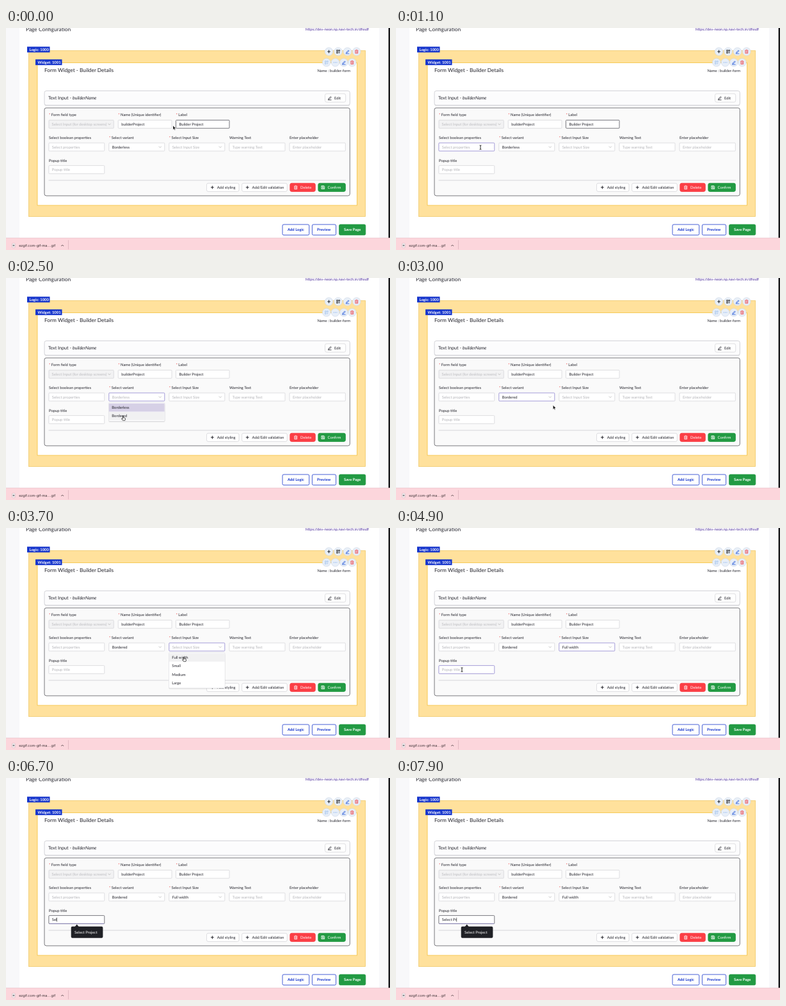
An HTML page that plays this animation: 600 px wide and 348 px high, repeating every 8000 ms.

```html
<!DOCTYPE html>
<html lang="en">
<head>
<meta charset="utf-8">
<style>
html, body { margin: 0; width: 100%; height: 100%; overflow: hidden; background: #fff; }
svg { display: block; width: 600px; height: 348px; }
text { font-family: Lato, sans-serif; text-rendering: geometricPrecision; white-space: pre; }
</style>
</head>
<body>
<svg viewBox="0 0 600 348"><g id="page"></g><g id="live"></g></svg>
<script>
const INK = '#24242c', HINT = '#b4b4b8', LINE = '#d6d6da', PURPLE = '#8f84cf',
      BLUE = '#1736cc', GREEN = '#229a43', RED = '#fb3e45';
const LOOP = 8000;

const rect = (x, y, x2, y2, fill, stroke = 'none', r = 0, extra = '') =>
  `<rect x="${x}" y="${y}" width="${x2 - x}" height="${y2 - y}" rx="${r}" fill="${fill}" stroke="${stroke}" stroke-width=".8" ${extra}/>`;
const text = (x, y, s, fill = INK, size = 5.9, extra = '') =>
  `<text x="${x}" y="${y}" font-size="${size}" fill="${fill}" ${extra}>${s}</text>`;
const path = (d, stroke = INK, w = .8, fill = 'none') =>
  `<path d="${d}" fill="${fill}" stroke="${stroke}" stroke-width="${w}"/>`;
const at = (x, y, s) => `<g transform="translate(${x} ${y})">${s}</g>`;
const label = (x, y, s, needed) =>
  needed ? text(x, y, '*', '#f04444') + text(x + 3.8, y, s) : text(x, y, s);
const chevron = (x, y, color = '#aaa') => path(`M${x - 2} ${y - 1}l2 2l2-2`, color, .7);

const icon = {
  plus: c => path('M-2.4 0H2.4M0-2.4V2.4', c, 1),
  grid: c => path('M-2.4-2.4h1.8v1.8h-1.8zM.7-2.4h1.8v1.8H.7zM-2.4.7h1.8v1.8h-1.8zM.7 1.6h1.8M1.6.7v1.8', c, .8),
  dots: c => path('M-2.8 0h1M-.5 0h1M1.8 0h1', c, 1),
  pen: c => path('M-1.6 1L1.5-2.1L2.5-1.1L-.6 2L-2 2.3zM-2.8 3.2H2.8', c, .8),
  bin: c => path('M-2.6-1.8H2.6M-.9-2.7H.9M-1.9-1.6V2.7H1.9V-1.6M-.6-.4V1.5M.6-.4V1.5', c, .8),
  save: c => path('M-2.4-2.4H1.5L2.4-1.5V2.4H-2.4zM-1.3-2.2V-.7H1V-2.2M-1.2 2.2V.7H1.2V2.2', c, .8)
};
const round = (x, y, name, color) =>
  `<circle cx="${x}" cy="${y}" r="6.3" fill="#e8eff8" stroke="#cbd6e4" stroke-width=".6"/>` + at(x, y, icon[name](color));
const button = (x, x2, s, name, tx, fill = '#fff', color = INK, y = 243.3, y2 = 256.4) =>
  rect(x, y, x2, y2, fill, fill === '#fff' ? LINE : fill, 2.5) +
  at(tx - 7.3, (y + y2) / 2, icon[name](color)) + text(tx, (y + y2) / 2 + 2.1, s, color);
const bigButton = (x, x2, s, tx, fill, color, stroke) =>
  rect(x, 308, x2, 324.6, fill, stroke, 2) + text(tx, 318.4, s, color, 5.9, 'font-weight="700"');
const tag = (x, y, x2, s) =>
  rect(x, y, x2, y + 9, BLUE) + text(x + 3.6, y + 6.6, s, '#fff', 5.9, 'font-weight="700"');

const page = [
  rect(0, 0, 600, 348, '#f8f8fa'), rect(21, 0, 583, 330, '#fff'), rect(597.6, 0, 600, 330, '#17171a'),
  text(31, 4.8, 'Page Configuration', INK, 8.4),
  text(468, 3.6, 'https://dev-neon.np.navi-tech.in/dfssdf', '#4b2c9b', 5.8),

  rect(35.5, 35.5, 561.5, 295.5, '#ffe19c', '#efc968'),
  rect(49, 54.5, 548.5, 278, '#fff', '#f4c13c'),
  tag(33, 29.3, 68.5, 'Logic: 1000'), tag(46, 49.2, 87.5, 'Widget: 1001'),
  round(504.5, 37, 'plus', '#222'), round(519, 37, 'grid', '#222'),
  round(533.5, 37, 'pen', '#2458d8'), round(547.8, 37, 'bin', '#ee4048'),
  round(500.8, 54, 'grid', '#a9c7ef'), round(514.5, 54, 'dots', '#6fa0e8'),
  round(527.8, 54, 'pen', '#2458d8'), round(540.8, 54, 'bin', '#ee4048'),
  text(60, 69.2, 'Form Widget - Builder Details', INK, 8.3),
  text(486.5, 68.6, 'Name : builder-form', INK, 5.85),

  rect(60, 99.5, 537.5, 122.4, '#e6e6e8', 'none', 3),
  rect(60, 98.5, 537.3, 121, '#fcfcfd', '#c9c9ce', 3),
  text(66, 112.2, 'Text Input - <tspan font-style="italic" font-size="7">builderName</tspan>', INK, 7.2),
  button(498.5, 530.7, 'Edit', 'pen', 513, '#fff', INK, 103, 116.2),

  rect(60, 125.2, 537.3, 263, '#fafafa', '#56565c', 3),
  label(67, 138.4, 'Form field type', 1), label(175.2, 138.4, 'Name (Unique identifier)', 1), label(265.5, 138.4, 'Label', 1),
  label(67, 174, 'Select boolean properties'), label(161, 174, 'Select variant', 1),
  label(254.8, 174, 'Select Input Size', 1), label(349, 174, 'Warning Text'), label(443, 174, 'Enter placeholder'),
  label(67, 209.6, 'Popup title'),
  path('M66.5 238.8H531', '#cfcfd3', .8),
  button(313.5, 364, 'Add styling', 'plus', 329.7), button(368.6, 439.3, 'Add/Edit validation', 'plus', 384.5),
  button(443.8, 483.3, 'Delete', 'bin', 460, RED, '#fff'), button(487.8, 530.4, 'Confirm', 'save', 502.6, GREEN, '#fff'),

  bigButton(432, 473.7, 'Add Logic', 440, '#fff', BLUE, BLUE),
  bigButton(478.4, 515.6, 'Preview', 486, '#fff', BLUE, BLUE),
  bigButton(520.5, 561.8, 'Save Page', 528, GREEN, '#fff', GREEN),

  rect(0, 329, 600, 348, '#fcd6dc'), path('M0 329.2H600', '#e6c0c7', .6),
  rect(9.6, 337.6, 14.2, 344.2, '#fff', '#d9b9c0', .6), rect(10.6, 339.6, 13.2, 342.2, '#8a8a90'),
  text(20.3, 343.1, 'ezgif.com-gif-ma....gif', '#3a2f33', 5.4, 'style="font-family:Inter,sans-serif"'),
  path('M86.2 342l2-2l2 2', '#5c4c50', .9), path('M97.5 332.5V347', '#d8aeb6', .7)
];
document.getElementById('page').innerHTML = page.join('');

// pointer stops: time, x, y
const stops = [[0, 261, 153], [300, 261, 153], [1000, 132, 187], [1300, 132, 187], [1750, 205, 187],
  [2000, 205, 187], [2400, 183, 217], [2750, 183, 217], [3200, 290, 187], [3350, 290, 187],
  [3650, 278, 203], [4050, 278, 203], [4800, 103, 222]];
function pointer(t) {
  const i = stops.findIndex(s => s[0] > t);
  if (i < 0) return stops.at(-1).slice(1);
  const [t0, x0, y0] = stops[i - 1], [t1, x1, y1] = stops[i];
  const k = (t - t0) / (t1 - t0), e = k * k * (3 - 2 * k);
  return [x0 + (x1 - x0) * e, y0 + (y1 - y0) * e];
}

const cursors = {
  arrow: path('M0 0V6.4L1.5 5L2.5 7.2L3.5 6.7L2.5 4.6H4.5z', '#fff', .4, '#111'),
  beam: path('M-1.4-3.2Q0-3.2 0-2.4Q0-3.2 1.4-3.2M0-2.6V2.8M-1.4 3.4Q0 3.4 0 2.6Q0 3.4 1.4 3.4', '#111', .9),
  hand: path('M-.6-.6Q0-1.3.6-.6V2L3 2.6Q3.7 2.8 3.5 3.8L3 6.2H-.6L-2.5 3.4Q-2.2 2.5-.6 3.6z', '#111', .7, '#fff')
};

const typing = 'Select Pr', keys = [6300, 6480, 6660, 6880, 7050, 7200, 7390, 7570, 7780];
const pen = document.createElement('canvas').getContext('2d');
function caretX(s) {
  pen.font = '59px Lato, sans-serif';
  return 71.8 + pen.measureText(s).width / 10;
}

function menu(x, y2, items, chosen, active) {
  return rect(x - .3, 197, x + 88, y2 + 1.4, '#000', 'none', 2, 'opacity=".1"') +
    rect(x, 195.3, x + 87.5, y2, '#fff', '#e4e4e8', 1.5) +
    items.map((s, i) => {
      const y = 196.6 + i * 13.2;
      const fill = i === chosen ? '#d6d0e6' : i === active ? '#f1f1f2' : '#fff';
      return rect(x + .4, y, x + 87.1, y + 13, fill) + text(x + 4.8, y + 8.5, s);
    }).join('');
}

function draw(t) {
  const [px, py] = pointer(t);
  const variantOpen = t >= 1900 && t < 2700, sizeOpen = t >= 3300 && t < 3900;
  const focus = t < 1900 ? 'label' : t < 3300 ? 'variant' : t < 5400 ? 'size' : 'popup';
  const typed = typing.slice(0, keys.filter(k => k <= t).length);
  let kind = 'arrow';

  function field(x, x2, y, s, { hint = true, id = '', pick = false } = {}) {
    const over = !typed && px > x && px < x2 && py > y && py < y + 13;
    if (over) kind = pick ? 'hand' : 'beam';
    const focused = id && id === focus;
    const edge = focused ? (pick ? PURPLE : '#56565e') : over ? PURPLE : LINE;
    return rect(x, y, x2, y + 12.8, '#fff', edge, 1) +
      text(x + 4.9, y + 8.5, s, hint ? HINT : INK) + (pick ? chevron(x2 - 7, y + 6.4) : '');
  }

  let out = rect(67, 144.4, 168.3, 157.2, '#f2f2f3', LINE, 1) +
    text(71.6, 152.9, 'Select Input (for desktop screens)', '#bcbcc0') + chevron(161.5, 150.8) +
    field(175.3, 259, 144.4, 'builderProject', { hint: false }) +
    field(265.5, 349, 144.4, 'Builder Project', { hint: false, id: 'label' }) +
    field(66.9, 153.8, 180.1, 'Select properties') +
    field(160.8, 247.8, 180.1, t < 2700 ? 'Borderless' : 'Bordered', { hint: variantOpen, id: 'variant', pick: true }) +
    field(254.8, 341.8, 180.1, t < 3900 ? 'Select Input Size' : 'Full width', { hint: t < 3900, id: 'size', pick: true }) +
    field(348.9, 436, 180.1, 'Type warning Text') + field(443, 530.3, 180.1, 'Enter placeholder') +
    field(66.9, 153.8, 215.6, typed || 'Popup title', { hint: !typed, id: 'popup' });

  if (variantOpen) out += menu(160.5, 224.5, ['Borderless', 'Bordered'], 0, py > 209 ? 1 : -1);
  if (sizeOpen) out += menu(254.5, 251, ['Full width', 'Small', 'Medium', 'Large'], -1, 0);
  if (variantOpen || sizeOpen) kind = 'hand';

  if (typed) {
    const x = caretX(typed);
    out += path(`M${x} 218.8V225.4`, '#222', .6) + path('M67.5 228.4H153.3', PURPLE, .7) +
      path('M107.5 233.2l3.2-3.6l3.2 3.6z', 'none', 0, '#202126') +
      rect(101.7, 232.7, 151.4, 250.8, '#202126', 'none', 2) + text(107, 243.9, 'Select Project', '#fff');
  } else {
    out += at(px, py, cursors[kind]);
  }
  document.getElementById('live').innerHTML = out;
}

const start = performance.now();
function tick() {
  const t = (performance.now() - start) % LOOP;
  draw(Math.floor(t / 100) * 100);
  requestAnimationFrame(tick);
}
tick();
</script>
</body>
</html>
```
